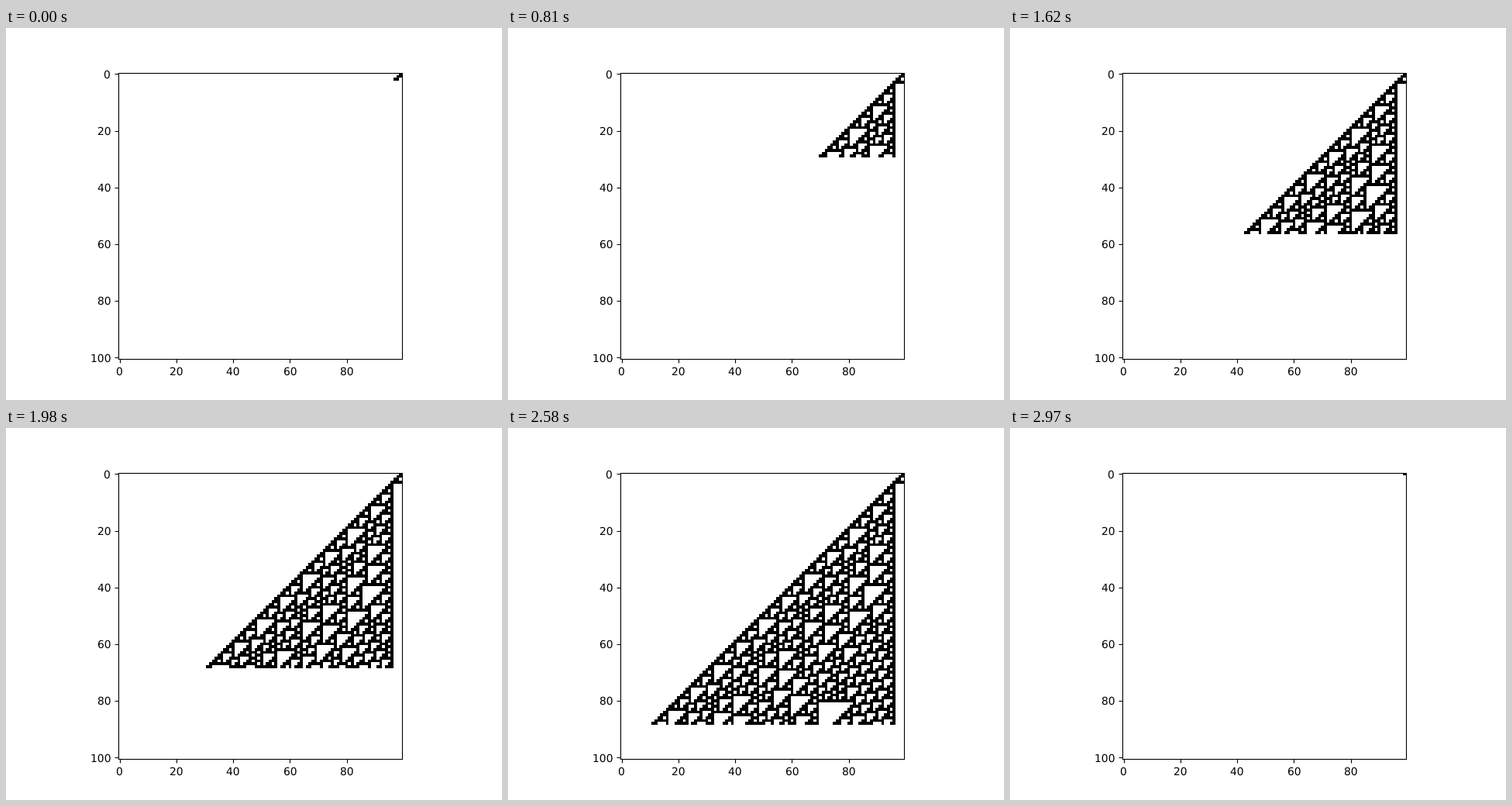
An HTML page with a canvas that plays this animation: 640x480 px, repeating every 3000 ms.

```html
<!DOCTYPE html>
<html lang="en">
<head>
<meta charset="utf-8">
<title>Cellular automaton</title>
<style>
  html, body { margin: 0; width: 100%; height: 100%; overflow: hidden; background: #fff; }
  canvas, svg { position: absolute; left: 0; top: 0; width: 640px; height: 480px; }
  text { font: 13.889px "DejaVu Sans", sans-serif; fill: #000; text-rendering: geometricPrecision; }
</style>
</head>
<body>
<canvas id="plot" width="640" height="480"></canvas>
<svg id="labels" viewBox="0 0 640 480"></svg>
<script>
const COLS = 100, ROWS = 101, STEP = 30, FRAMES = 100, RULE = 110;
const BOX = { x: 145.03, y: 57.6, w: 365.94, h: 369.6 };
const LINE = 1.111, DIGIT = 8.837;
const ctx = document.getElementById('plot').getContext('2d');
const labels = document.getElementById('labels');

// Both ends of a row mirror their inner neighbour.
function nextRow(row) {
  return row.map((c, i) => {
    const left = i > 0 ? row[i - 1] : row[1];
    const right = i < COLS - 1 ? row[i + 1] : row[COLS - 2];
    return RULE >> (left * 4 + c * 2 + right) & 1;
  });
}

const grid = [Array.from({ length: COLS }, (_, i) => +(i === COLS - 1))];
while (grid.length < ROWS) grid.push(nextRow(grid[grid.length - 1]));

// Cell borders fall on whole pixels.
const snap = v => Math.ceil(v - 0.5 - 1e-9);
const edgeX = c => snap(145 + 366 * c / COLS);
const edgeY = r => snap(57 + 370 * r / ROWS);

const tickX = v => BOX.x + (v + 0.5) * BOX.w / COLS;
const tickY = v => BOX.y + (v + 0.5) * BOX.h / ROWS;

function addLabel(value, x, y) {
  const el = document.createElementNS('http://www.w3.org/2000/svg', 'text');
  el.setAttribute('x', Math.round(x));
  el.setAttribute('y', Math.round(y));
  el.textContent = value;
  labels.appendChild(el);
}

function addLabels() {
  for (let v = 0; v <= 100; v += 20) {
    const width = String(v).length * DIGIT;
    if (v < COLS) addLabel(v, tickX(v) - width / 2, 448);
    addLabel(v, 135.3 - width, tickY(v) + 5.2);
  }
}

function drawAxes() {
  ctx.strokeStyle = '#000';
  ctx.lineWidth = LINE;
  ctx.strokeRect(145.5, 58.5, 366, 369);
  ctx.beginPath();
  for (let v = 0; v <= 100; v += 20) {
    if (v < COLS) {
      const x = Math.round(tickX(v)) + 0.5;
      ctx.moveTo(x, 427.5);
      ctx.lineTo(x, 432.5);
    }
    const y = Math.round(tickY(v)) + 0.5;
    ctx.moveTo(140.5, y);
    ctx.lineTo(145.5, y);
  }
  ctx.stroke();
}

function drawCells(count) {
  ctx.save();
  ctx.beginPath();
  ctx.rect(145, 58, 366, 369);
  ctx.clip();
  ctx.fillStyle = '#000';
  for (let r = 0; r < count; r++) {
    const y = edgeY(r), h = edgeY(r + 1) - y;
    for (let c = 0; c < COLS; c++) {
      if (grid[r][c]) ctx.fillRect(edgeX(c), y, edgeX(c + 1) - edgeX(c), h);
    }
  }
  ctx.restore();
}

function draw(frame) {
  ctx.fillStyle = '#fff';
  ctx.fillRect(0, 0, 640, 480);
  drawCells(frame === FRAMES - 1 ? 1 : frame + 3);
  drawAxes();
}

const start = performance.now();
let shown = 0;

function tick(now) {
  const frame = Math.floor(Math.max(0, now - start) / STEP + 1e-6) % FRAMES;
  if (frame !== shown) draw(shown = frame);
  requestAnimationFrame(tick);
}

addLabels();
draw(0);
requestAnimationFrame(tick);
</script>
</body>
</html>
```
